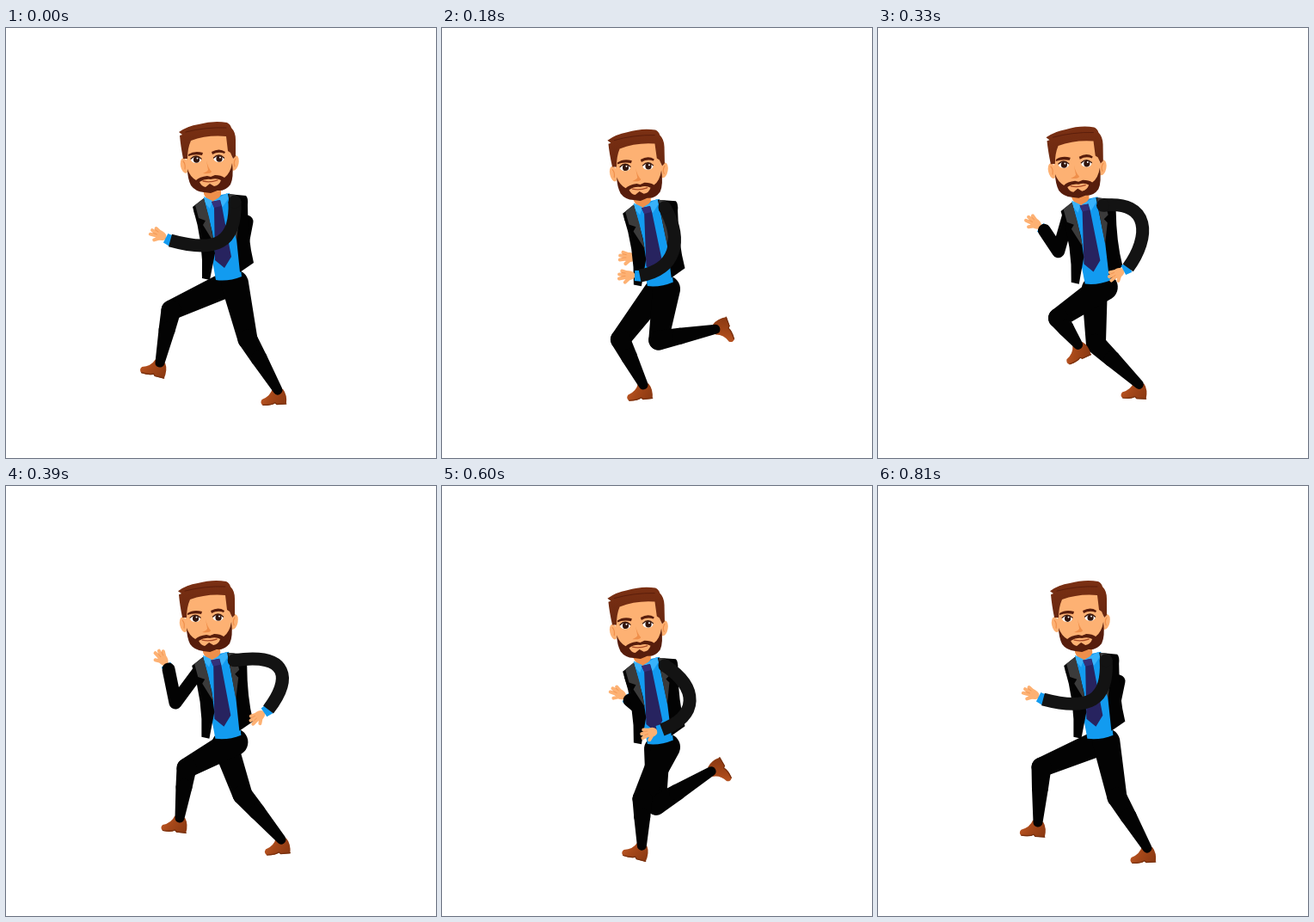
Animation, 500 px wide and 500 px high, one loop 840 ms. Source, as an HTML page with a canvas:

```html
<!DOCTYPE html>
<html lang="en">
<head>
<meta charset="utf-8">
<title>Running man</title>
<style>
  html, body { margin: 0; width: 100%; height: 100%; overflow: hidden; background: #fff; }
  canvas { display: block; width: 500px; height: 500px; }
</style>
</head>
<body>
<canvas id="stage" width="500" height="500"></canvas>
<script>
const ctx = document.getElementById('stage').getContext('2d');
const LOOP = 840, STEP = 30;
const BLACK = '#030303', SLEEVE = '#131313', LAPEL = '#3b3b3b';
const SKIN = '#fdb173', SHADE = '#ef8f4b', HAIR = '#6a2810', BEARD = '#571d0c';
const SHIRT = '#129bf0', TIE = '#27235f';

const TIMES = [0, 120, 270, 390, 510, 690, 810];

// Each leg row: knee x, knee y, ankle x, ankle y, shoe angle
const LEG_A = [
  [192, 328, 179, 389, 14], [199, 350, 206, 414, -4], [228, 374, 281, 410, -4],
  [275, 359, 320, 411, -5], [270, 363, 332, 348, -116], [222, 369, 272, 341, -80],
  [190, 327, 186, 391, 4]
];
const LEG_B = [
  [281, 362, 316, 421, -3], [273, 367, 336, 361, -116], [217, 351, 270, 354, -58],
  [210, 328, 202, 386, 6], [233, 350, 202, 411, 28], [237, 371, 272, 420, -3],
  [278, 362, 313, 421, -3]
];
// Near arm row: two curve controls, wrist, hand angle
const NEAR_ARM = [
  [268, 250, 245, 262, 191, 247, 207], [272, 265, 258, 282, 208, 274, 194],
  [300, 213, 297, 265, 269, 298, 162], [330, 193, 332, 225, 305, 260, 146],
  [322, 202, 325, 240, 293, 274, 146], [275, 262, 268, 286, 216, 282, 190],
  [268, 250, 245, 262, 192, 248, 207]
];
// Far arm row: elbow, wrist, hand angle
const FAR_ARM = [
  [280, 225, 274, 256, 185], [262, 245, 250, 265, 185], [228, 267, 203, 261, 193],
  [197, 252, 189, 213, 240], [214, 261, 196, 231, 226], [255, 255, 245, 262, 200],
  [280, 227, 274, 256, 185]
];

// Periodic cubic interpolation through unevenly spaced poses
function pose(rows, times, period, t) {
  const n = times.length;
  const time = i => times[(i + n) % n] + Math.floor(i / n) * period;
  const row = i => rows[(i + n) % n];
  let k = n - 1;
  while (times[k] > t) k--;
  const h = time(k + 1) - time(k), s = (t - time(k)) / h;
  const slope = (i, c) => {
    const h0 = time(i) - time(i - 1), h1 = time(i + 1) - time(i);
    const s0 = (row(i)[c] - row(i - 1)[c]) / h0, s1 = (row(i + 1)[c] - row(i)[c]) / h1;
    return (s0 * h1 + s1 * h0) / (h0 + h1);
  };
  return row(k).map((a, c) => {
    const b = row(k + 1)[c], e = s * s * (3 - 2 * s);
    return a + (b - a) * e
      + h * slope(k, c) * s * (1 - s) * (1 - s)
      - h * slope(k + 1, c) * s * s * (1 - s);
  });
}

const limb = (rows, t) => pose(rows, TIMES, LOOP, t);
const bobAt = t => pose([[0], [.49], [1], [.1]], [0, 105, 265, 390], 420, t % 420)[0];
const rad = deg => deg * Math.PI / 180;

function shape(path, color) {
  ctx.fillStyle = color;
  ctx.fill(new Path2D(path));
}

function line(path, color, width) {
  ctx.strokeStyle = color;
  ctx.lineWidth = width;
  ctx.stroke(new Path2D(path));
}

function oval(x, y, rx, ry, color, turn = 0) {
  ctx.fillStyle = color;
  ctx.beginPath();
  ctx.ellipse(x, y, rx, ry, turn, 0, 7);
  ctx.fill();
}

// Hull of two circles
function taper(x1, y1, r1, x2, y2, r2) {
  const a = Math.atan2(y2 - y1, x2 - x1);
  const d = Math.acos((r1 - r2) / Math.hypot(x2 - x1, y2 - y1));
  ctx.fillStyle = BLACK;
  ctx.beginPath();
  ctx.arc(x1, y1, r1, a + d, a - d + 2 * Math.PI);
  ctx.arc(x2, y2, r2, a - d, a + d);
  ctx.fill();
}

function placed(x, y, deg, draw) {
  ctx.save();
  ctx.translate(x, y);
  ctx.rotate(rad(deg));
  draw();
  ctx.restore();
}

function shoe() {
  const leather = ctx.createLinearGradient(-20, 0, 8, 16);
  leather.addColorStop(0, '#c25a26');
  leather.addColorStop(.45, '#a54719');
  leather.addColorStop(1, '#8b3912');
  shape('M-6-2Q0 1 6-1Q11 6 9 17H-2L-4 15Q-8 18-18 17Q-22 14-19 10Q-9 7-6-2Z', leather);
  line('M-18 16.5Q-8 17-4 14.5L-2 16.5H9', '#76300f', 1.2);
}

function leg([kx, ky, ax, ay, turn], [hx, hy], hipRadius) {
  placed(ax, ay, turn, shoe);
  const cx = kx + (ax - kx) * .38, cy = ky + (ay - ky) * .38;
  taper(hx, hy, hipRadius, kx, ky, 11.5);
  taper(kx, ky, 11.5, cx, cy, 9.5);
  taper(cx, cy, 9.5, ax, ay, 5.5);
}

function hand(flip) {
  ctx.scale(1, flip);
  oval(13, 0, 7.5, 5.5, SKIN);
  line('M12-3L17-8M15-2L24-4M16 1L24 1M14 3L21 5', SKIN, 4);
  line('M17-.8L22-1.4M17 2.6L21 3', SHADE, .7);
  shape('M-2-6.5L6-6V6L-2 6.5Z', SHIRT);
}

function farArm([ex, ey, wx, wy, turn], [sx, sy]) {
  placed(wx, wy, turn, () => hand(1));
  line(`M${sx} ${sy}L${ex} ${ey}L${wx} ${wy}`, BLACK, 15);
}

function nearArm([ax, ay, bx, by, wx, wy, turn], [sx, sy]) {
  placed(wx, wy, turn, () => hand(1));
  ctx.lineCap = 'butt';
  line(`M${sx} ${sy}C${ax} ${ay} ${bx} ${by} ${wx} ${wy}`, SLEEVE, 15);
  ctx.lineCap = 'round';
  oval(sx, sy, 7.5, 7.5, SLEEVE);
}

function torso() {
  shape('M230 198L260 192L268 235L274 289Q259 295 244 293L238 260Z', SHIRT);
  shape('M229 182H250V194Q246 201 240 202Q232 199 230 193Z', SHADE);
  shape('M230 196L240 201L237 210L230 202ZM257 192L241 201L252 208L260 196Z', '#38b2fa');
  shape('M239 202L249 200L251 207L262 266L254 279L243 270L242 209Z', TIE);
  shape('M239 202L249 200L250 207L242 209Z', '#34307a');
  shape('M217 208L230 198L240 238L243 262L237 293L228 291Q230 250 217 208Z', BLACK);
  shape('M258 193L279 195Q282 198 281 206Q281 245 288 273L272 284L268 245Z', BLACK);
  shape('M220 206L230 198L236 220L242 250L229 229L232 224L224 221Z', LAPEL);
  shape('M259 193L267 194L272 213L267 218L271 222L268 247Q262 215 259 193Z', LAPEL);
}

function head() {
  oval(207.5, 160, 4.5, 9, SKIN, -.2);
  oval(266, 157, 4.5, 9, SKIN, .2);
  line('M206 155Q209 158 208 164M267 152Q264 156 266 161', SHADE, 1.2);
  shape('M209 128L260 122L264 160Q263 178 254 187Q238 194 222 188Q212 177 210 162Z', SKIN);

  const hair = ctx.createLinearGradient(0, 108, 0, 150);
  hair.addColorStop(0, '#7b3013');
  hair.addColorStop(1, HAIR);
  shape('M202 125L205 124L201 121Q211 114 224 112Q242 107 257 110Q261 112 262 116Q267 121 267 130L267 149L264 152L261 145L258 143L256 126Q234 124 215 131Q211 140 211 152L206 152Q203 137 202 125Z', hair);
  line('M209 121Q232 115 256 116', '#551b0a', .8);

  shape('M211 164Q214 173 221 177Q225 173 234 172L238 173L243 171Q250 171 254 174Q261 169 263 157Q265 174 261 182Q255 190 246 189L238 192L230 191Q220 190 215 183Q211 175 211 164Z', BEARD);
  shape('M225 179Q231 175 238 176Q245 174 250 177Q248 183 242 184L237 181L232 185Q227 184 225 179Z', SKIN);
  line('M229 178Q237 180 246 177', '#a64724', 1.3);

  for (const [x, y] of [[221, 153], [247.5, 152]]) {
    oval(x, y, 6, 4, '#fff');
    oval(x + .5, y, 3.6, 3.8, '#32150c');
    oval(x + 1.5, y - 1.5, 1, 1, '#fff');
    line(`M${x - 6} ${y - 1}Q${x} ${y - 7} ${x + 6} ${y - 1}`, '#3b170b', 1.3);
  }
  shape('M212 147Q219 142 229 145L228 148Q219 146 212 149Z', BEARD);
  shape('M239 144Q248 139 255 144L254 146Q247 143 240 147Z', BEARD);
  shape('M233 154Q235 163 239 167Q238 170 229 169Q234 167 235 165Z', SHADE);
}

function draw(t) {
  const bob = bobAt(t);
  const body = new DOMMatrix()
    .translate(255 - 6 * bob, 290 + 8 * bob)
    .rotate(-1.4 * bob)
    .translate(-255, -290);
  const at = (x, y) => {
    const p = body.transformPoint({ x, y });
    return [p.x, p.y];
  };
  ctx.setTransform(1, 0, 0, 1, 0, 0);
  ctx.fillStyle = '#fff';
  ctx.fillRect(0, 0, 500, 500);
  ctx.lineCap = ctx.lineJoin = 'round';

  farArm(limb(FAR_ARM, t), at(226, 213));
  leg(limb(LEG_A, t), at(255, 299), 15);
  leg(limb(LEG_B, t), at(266, 297), 16);

  ctx.save();
  ctx.transform(body.a, body.b, body.c, body.d, body.e, body.f);
  torso();
  ctx.translate(0, 2 * bob);
  head();
  ctx.restore();

  nearArm(limb(NEAR_ARM, t), at(266, 202));
}

function tick() {
  draw(Math.floor(performance.now() % LOOP / STEP) * STEP);
  requestAnimationFrame(tick);
}
tick();
</script>
</body>
</html>
```
